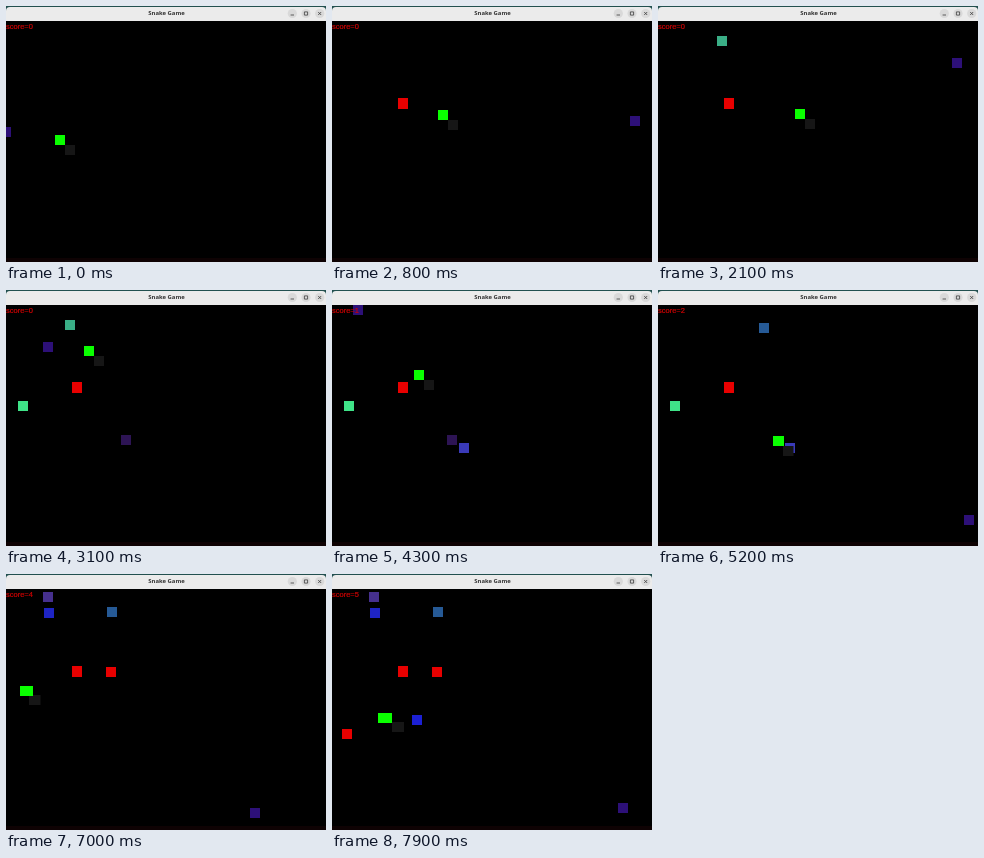
An HTML page with a canvas for the animation above (8000 ms loop, 320x256 px).

```html
<!DOCTYPE html>
<html lang="en">
<head>
<meta charset="utf-8">
<title>Snake Game</title>
<style>
  html, body { margin: 0; width: 100%; height: 100%; overflow: hidden; background: #000; }
  #stage { position: relative; width: 320px; height: 256px; overflow: hidden; background: #000; }
  #bar {
    position: absolute; inset: 0 0 auto; height: 15px; background: #22504f;
  }
  #bar::before {
    content: ""; position: absolute; inset: 1px 0 0; background: #ebebeb; border-radius: 4px 4px 0 0;
  }
  #bar b {
    position: absolute; left: 0; width: 321px; top: 0; line-height: 15px; text-align: center;
    font: bold 5.9px/15px "Open Sans", "Noto Sans", sans-serif; color: #303030;
  }
  #bar svg { position: absolute; left: 0; top: 0; }
  #field { position: absolute; left: 0; top: 15px; }
  #score {
    position: absolute; left: 0; top: 16px; white-space: pre;
    font: 7.5px/9px "Liberation Sans", Arial, sans-serif; color: #d00000;
    -webkit-text-stroke: 0.2px #d00000;
  }
  #edge { position: absolute; left: 0; top: 252px; width: 320px; height: 4px; background: #0e0203; }
</style>
</head>
<body>
<div id="stage">
  <div id="edge"></div>
  <canvas id="field" width="320" height="241"></canvas>
  <div id="score">score=0</div>
  <div id="bar">
    <b>Snake Game</b>
    <svg width="320" height="15" fill="none" stroke="#3c3c3c" stroke-width="0.8">
      <g fill="#d9d9d9" stroke="none">
        <circle cx="286.3" cy="7.5" r="4.6"/>
        <circle cx="300" cy="7.5" r="4.6"/>
        <circle cx="313.7" cy="7.5" r="4.6"/>
      </g>
      <path d="M284.6 9h3.4M298.4 5.9h3.2v3.2h-3.2zM312.2 6l3 3m0-3l-3 3"/>
    </svg>
  </div>
</div>
<script>
const LOOP = 8000, STEP = 100, SIZE = 10;
const ctx = document.getElementById("field").getContext("2d");
const label = document.getElementById("score");
ctx.translate(0, -15);

// Waypoints: time, x, y
const snakePath = [
  [0, 49, 129], [800, 106, 104], [2100, 137, 103], [3100, 78, 56], [3500, 59, 34],
  [4300, 82, 80], [5100, 112, 143], [5500, 125, 153], [6100, 74, 166],
  [7000, 14, 112], [7900, 46, 139]
];

// Repeated times are jumps across an edge
const roverPath = [
  [0, -5, 121], [100, -10, 121], [100, 319, 121], [800, 298, 110], [1300, 310, 96],
  [1800, 304, 52], [2100, 294, 52], [2450, 320, 52], [2450, -10, 52], [3100, 37, 52],
  [3600, 37, 15], [4050, 37, 15], [4300, 21, 15], [4700, -10, 15], [4700, 320, 15],
  [4850, 306, 15], [4950, 306, 5], [4950, 306, 252], [5400, 306, 204], [6100, 241, 204],
  [6300, 244, 204], [7200, 244, 242], [7600, 286, 242], [7900, 286, 229]
];

const food = (from, to, x, y, color, h = SIZE) => ({ from, to, x, y, color, h });
const foods = [
  food(500, LOOP, 66, 92, "#e80000", 11),
  food(1400, 3500, 59, 30, "#3aae86"),
  food(2300, 5100, 115, 145, "#2d1454"),
  food(3000, 7000, 12, 111, "#3fe388"),
  food(4000, 5500, 127, 153, "#3a3ab8"),
  food(4800, LOOP, 101, 33, "#265a96"),
  food(5300, LOOP, 100, 93, "#e80000"),
  food(5900, LOOP, 37, 18, "#46308e"),
  food(6600, LOOP, 38, 34, "#1e24c4"),
  food(7100, LOOP, 80, 141, "#1c20d4"),
  food(7600, LOOP, 10, 155, "#e80000")
];
const scoreTimes = [3500, 5100, 5500, 7000, 7500];

function at(path, t) {
  let i = 0;
  while (i < path.length - 2 && t >= path[i + 1][0]) i++;
  const [t0, x0, y0] = path[i], [t1, x1, y1] = path[i + 1];
  const k = Math.min(1, (t - t0) / (t1 - t0));
  return [Math.round(x0 + (x1 - x0) * k), Math.round(y0 + (y1 - y0) * k)];
}

function box(x, y, color, w = SIZE, h = SIZE) {
  ctx.fillStyle = color;
  ctx.fillRect(x, y, w, h);
}

function draw(t) {
  const score = scoreTimes.filter(s => t >= s).length;
  const [x, y] = at(snakePath, t);
  const grow = Math.max(0, score - 1);

  ctx.clearRect(0, 0, 320, 256);
  for (const f of foods) {
    if (t >= f.from && t < f.to) box(f.x, f.y, f.color, SIZE, f.h);
  }
  box(...at(roverPath, t), "#2d1078");
  box(x + (score > 4 ? 14 : score > 2 ? 9 : 10), y + (score > 2 ? 9 : 10), "#161616", SIZE + grow / 2);
  box(x, y, "#0aff00", SIZE + grow);
  label.textContent = "score=" + score;
}

function tick() {
  const t = performance.now() % LOOP;
  draw(Math.floor(t / STEP) * STEP);
  requestAnimationFrame(tick);
}
tick();
</script>
</body>
</html>
```
